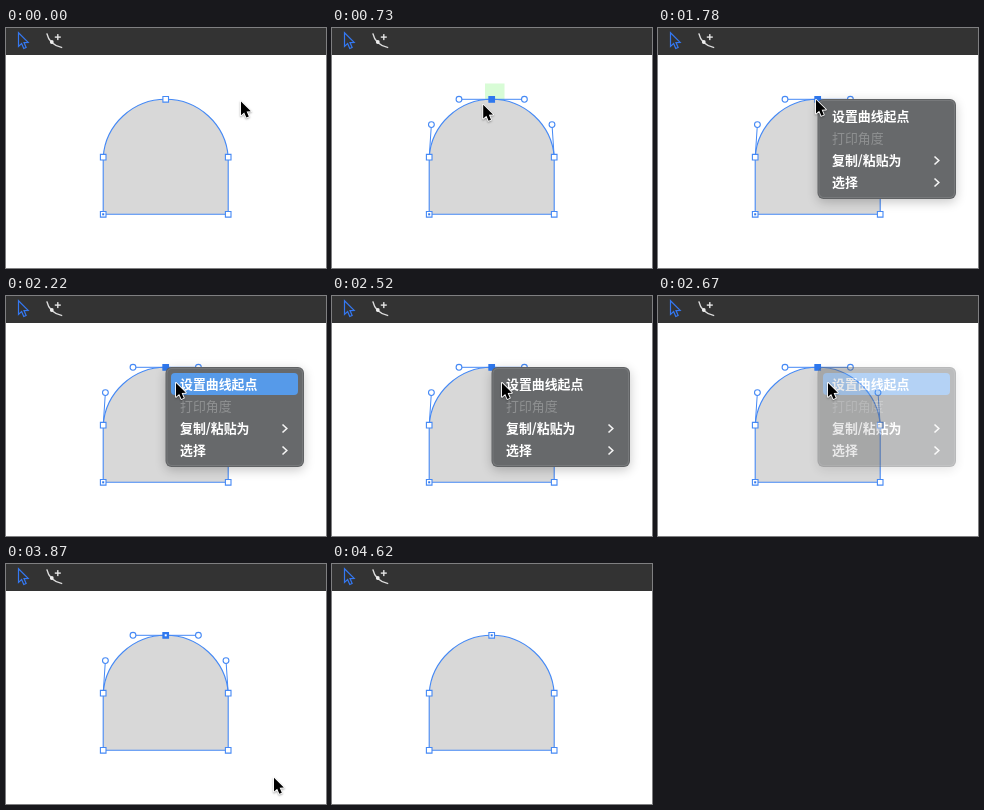
These frames come from a looping animation (320x240 px, 5070 ms). An HTML page with a canvas:

```html
<!DOCTYPE html>
<html lang="zh-CN">
<head>
<meta charset="utf-8">
<title>设置曲线起点</title>
<style>
  html, body { margin: 0; width: 100%; height: 100%; overflow: hidden; background: #fff; }
  canvas { display: block; width: 100vw; height: 100vh; }
</style>
</head>
<body>
<canvas id="stage"></canvas>
<script>
const W = 320, H = 240, LOOP = 5070, STEP = 149, LEAD = 18;
const BLUE = '#4589f5', SOLID = '#2f78ee';
const canvas = document.getElementById('stage');
const screen2d = canvas.getContext('2d');
const layer = document.createElement('canvas');
const layer2d = layer.getContext('2d');
let ctx = screen2d;

const SELECT = 5, OPEN = 12, HOVER = 14, BLINK = 17, FADE = 18, APPLY = 19, DESELECT = 27;

// The arch is mirrored about its centre line.
const arch = { mid: 159.7, half: 62.5, top: 71.3, shoulder: 129.2, bottom: 186.3 };
const topReach = 32.7, sideReach = 60.3, sideHandleY = 96.6;
const side = (sign, reach, y) => ({ x: arch.mid + sign * reach, y });

const anchors = [
  side(-1, arch.half, arch.bottom), side(-1, arch.half, arch.shoulder),
  side(0, 0, arch.top),
  side(1, arch.half, arch.shoulder), side(1, arch.half, arch.bottom)
];
const TOP = 2;

// Places where the pointer rests or turns.
const stops = [
  { at: 0, x: 235, y: 73.5 }, { at: 4, x: 156, y: 57 },
  { at: SELECT, x: 151.2, y: 76.8 }, { at: 8, x: 153, y: 78 },
  { at: 10, x: 158, y: 71.8 }, { at: OPEN, x: 158, y: 71.8 },
  { at: 15, x: 170, y: 87 }, { at: 22, x: 170, y: 87 },
  { at: 26, x: 268, y: 213.8 }, { at: 29, x: 261.5, y: 217 },
  { at: 31, x: 266, y: 245 }
];

const ease = p => p * p * (3 - 2 * p);

function pointerAt(step) {
  const next = stops.findIndex(stop => stop.at > step);
  if (next < 0) return stops.at(-1);
  const a = stops[next - 1], b = stops[next];
  const p = ease((step - a.at) / (b.at - a.at));
  return { x: a.x + (b.x - a.x) * p, y: a.y + (b.y - a.y) * p };
}

function line(...points) {
  ctx.beginPath();
  points.forEach(({ x, y }) => ctx.lineTo(x, y));
}

function stroke(color, width) {
  ctx.strokeStyle = color;
  ctx.lineWidth = width;
  ctx.stroke();
}

function fill(color) {
  ctx.fillStyle = color;
  ctx.fill();
}

function fillRect(x, y, w, h, color) {
  ctx.fillStyle = color;
  ctx.fillRect(x, y, w, h);
}

function fillRound(x, y, w, h, r, color) {
  ctx.beginPath();
  ctx.roundRect(x, y, w, h, r);
  fill(color);
}

function arrow(x, y, scale) {
  const outline = [[0, 0], [0, 14.7], [3.4, 11.6], [5.7, 17], [8.3, 15.9], [6, 10.6], [10.5, 10.4]];
  line(...outline.map(([px, py]) => ({ x: x + px * scale, y: y + py * scale })));
  ctx.closePath();
}

function toolbar() {
  fillRect(0, 0, W, 27, '#333');
  arrow(12.5, 4.8, 0.92);
  stroke('#3478f2', 1.2);
  ctx.beginPath();
  ctx.moveTo(40.8, 5.3);
  ctx.quadraticCurveTo(43.4, 17, 56.2, 19.6);
  stroke('#ddd', 1.4);
  ctx.beginPath();
  ctx.arc(45.8, 14, 1.9, 0, 7);
  fill('#eee');
  fillRect(48.8, 8.4, 6, 1.4, '#e4e4e4');
  fillRect(51.1, 6.1, 1.4, 6, '#e4e4e4');
}

function handle(from, to) {
  line(from, to);
  stroke(BLUE, 1);
  ctx.beginPath();
  ctx.arc(to.x, to.y, 2.9, 0, 7);
  fill('#fff');
  stroke(BLUE, 1.1);
}

function shape(selected, startIndex) {
  const [bl, left, top, right, br] = anchors;
  const sideHandle = sign => side(sign, sideReach, sideHandleY);
  const topHandle = sign => side(sign, topReach, arch.top);
  const curve = (...points) => ctx.bezierCurveTo(...points.flatMap(({ x, y }) => [x, y]));

  line(br, bl, left);
  curve(sideHandle(-1), topHandle(-1), top);
  curve(topHandle(1), sideHandle(1), right);
  ctx.closePath();
  fill('#d8d8d8');
  stroke(BLUE, 1.1);

  if (selected) {
    for (const sign of [-1, 1]) {
      handle(sign < 0 ? left : right, sideHandle(sign));
      handle(top, topHandle(sign));
    }
  }

  anchors.forEach(({ x, y }, i) => {
    const active = selected && i === TOP;
    ctx.beginPath();
    ctx.rect(x - 2.8, y - 2.8, 5.6, 5.6);
    fill(active ? SOLID : '#fff');
    stroke(active ? SOLID : BLUE, 1.1);
    if (i === startIndex) fillRect(x - 1, y - 1, 2, 2, active ? '#fff' : SOLID);
  });
}

function item(label, row, { disabled = false, submenu = false } = {}) {
  const y = 93 + row * 22;
  ctx.font = `${disabled ? 500 : 700} 12.9px "Noto Sans CJK SC", "Noto Sans CJK", sans-serif`;
  ctx.fillStyle = disabled ? '#8f9192' : '#fff';
  ctx.fillText(label, 174, y);
  if (submenu) {
    line({ x: 276.5, y: y - 8.5 }, { x: 280.8, y: y - 4.5 }, { x: 276.5, y: y - 0.5 });
    stroke('#f4f4f4', 1.6);
  }
}

function menuPanel(highlighted) {
  ctx.save();
  ctx.shadowColor = 'rgba(0,0,0,.22)';
  ctx.shadowBlur = 11 * canvas.width / W;
  ctx.shadowOffsetY = 3 * canvas.height / H;
  fillRound(159.5, 71, 138.5, 100, 6, '#606264');
  ctx.restore();
  fillRound(160.5, 72, 136.5, 98, 5, '#77797b');
  fillRound(161.5, 73, 134.5, 96, 4.5, '#67696b');
  if (highlighted) fillRound(165, 77, 127, 22, 4, '#569ae9');
  item('设置曲线起点', 0);
  item('打印角度', 1, { disabled: true });
  item('复制/粘贴为', 2, { submenu: true });
  item('选择', 3, { submenu: true });
}

// Painted on its own layer so that the whole panel fades as one.
function menu(alpha, highlighted) {
  ctx = layer2d;
  clear();
  menuPanel(highlighted);
  ctx = screen2d;
  ctx.globalAlpha = alpha;
  ctx.drawImage(layer, 0, 0, W, H);
  ctx.globalAlpha = 1;
}

function pointer({ x, y }) {
  ctx.save();
  ctx.lineJoin = 'round';
  ctx.shadowColor = 'rgba(0,0,0,.35)';
  ctx.shadowBlur = 2 * canvas.width / W;
  ctx.shadowOffsetY = canvas.height / H;
  arrow(x, y, 0.94);
  stroke('#fff', 1.8);
  ctx.restore();
  fill('#000');
}

function clear() {
  ctx.setTransform(canvas.width / W, 0, 0, canvas.height / H, 0, 0);
  ctx.clearRect(0, 0, W, H);
}

function draw(t) {
  const step = Math.floor((t + LEAD) / STEP);
  clear();
  fillRect(0, 0, W, H, '#fff');
  toolbar();
  if (step === SELECT) fillRect(153, 55.5, 19.5, 18, '#d8fcd6');
  shape(step >= SELECT && step < DESELECT, step < APPLY ? 0 : TOP);
  if (step >= OPEN && step < APPLY) {
    menu(step < FADE ? 1 : 0.44, step >= HOVER && step !== BLINK);
  }
  if (step < stops.at(-1).at) pointer(pointerAt(step));
}

function resize() {
  const ratio = window.devicePixelRatio || 1;
  canvas.width = layer.width = Math.round(innerWidth * ratio);
  canvas.height = layer.height = Math.round(innerHeight * ratio);
}

const began = performance.now();
function tick() {
  draw(Math.max(0, performance.now() - began) % LOOP);
  requestAnimationFrame(tick);
}

addEventListener('resize', resize);
resize();
tick();
</script>
</body>
</html>
```
